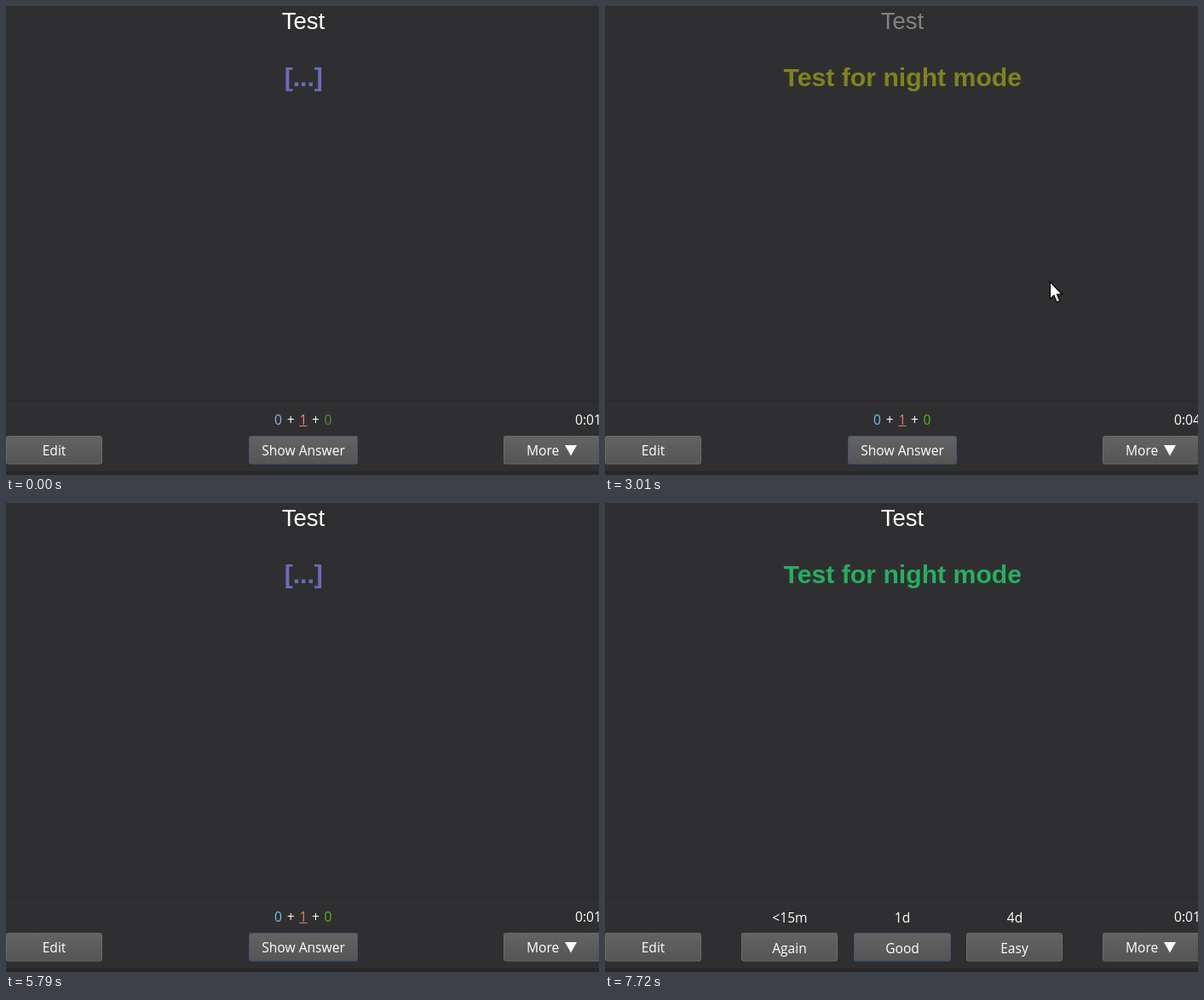
An HTML page for the animation above (8 s loop, 696x550 px).

```html
<!DOCTYPE html>
<html lang="en">
<head>
<meta charset="utf-8">
<title>Flashcard review</title>
<style>
  html, body { margin: 0; width: 100%; height: 100%; overflow: hidden; background: #2f2f31; }
  svg { display: block; width: 696px; height: 550px; }
  text { fill: #fff; font: 15.6px "Open Sans", "Noto Sans", sans-serif; text-anchor: middle; }
  #card text { font-family: "Liberation Sans", Arial, sans-serif; }
  #front { font-size: 27.5px; }
  #cloze { font-size: 30.2px; font-weight: bold; }
  #time, .start { text-anchor: start; }
  .btn rect { fill: url(#face); stroke: #6b6b6b; }
  .btn.focus rect { stroke: #455579; }
  .btn.hover rect { fill: url(#lit); }
</style>
</head>
<body>
<svg viewBox="0 0 696 550">
  <defs>
    <linearGradient id="face" x2="0" y2="1"><stop stop-color="#636363"/><stop offset="1" stop-color="#555"/></linearGradient>
    <linearGradient id="lit" x2="0" y2="1"><stop stop-color="#6b6b6b"/><stop offset="1" stop-color="#646464"/></linearGradient>
  </defs>
  <rect width="696" height="550" fill="#2f2f31"/>
  <path d="M0 462.5H696" stroke="#29292b"/>
  <rect y="546" width="696" height="4" fill="#2a272b"/>
  <path d="M0 546.5H696" stroke="#232124"/>

  <g id="card">
    <text id="front" x="349" y="27">Test</text>
    <text id="cloze" x="349.3" y="94"></text>
  </g>

  <g id="fixed">
    <text id="time" x="668" y="491"></text>
  </g>
  <g id="ask">
    <text id="due" x="319.5" y="491">0</text>
    <text x="334.3" y="491">+</text>
    <text id="learn" x="349" y="491">1</text>
    <path id="line" d="M344.5 492.5H353.5"/>
    <text x="363.5" y="491">+</text>
    <text id="review" x="378" y="491">0</text>
  </g>
  <g id="grade">
    <text x="217" y="492">&lt;15m</text>
    <text x="349" y="492">1d</text>
    <text x="481" y="492">4d</text>
  </g>
  <path id="cursor" d="M.5.7V20.4L5 16.2L8.2 24.2L11.7 22.7L8.5 15H14.3Z" fill="#fff" stroke="#000" stroke-width="1.1"/>
</svg>
<script>
const $ = id => document.getElementById(id);

function button(parent, x, w, label, y, focus) {
  const g = document.createElementNS("http://www.w3.org/2000/svg", "g");
  g.setAttribute("class", focus ? "btn focus" : "btn");
  g.innerHTML = `<rect x="${x + .5}" y="504.5" width="${w - 1}" height="32.5" rx="2"/>` +
    `<text x="${x + w / 2}" y="${y}">${label}</text>`;
  $(parent).append(g);
  return g;
}

button("fixed", 0, 113, "Edit", 527);
const more = button("fixed", 584, 114, "", 527);
more.innerHTML += '<text class="start" x="611" y="527">More</text><path d="M656 515H670L663 527.5Z" fill="#fff"/>';
const show = button("ask", 285, 128, "Show Answer", 527, true);
button("grade", 160, 113, "Again", 528);
const good = button("grade", 292, 114, "Good", 528, true);
button("grade", 424, 113, "Easy", 528);

const YELLOW = "#ffff00", GREEN = "#27ae60";
const SOFT = ["#8fb4e0", "#f0877a", "#5d8a3c"], VIVID = ["#6cc0ee", "#e58260", "#4fbe10"];
const ask = { answer: "", bar: "ask", fade: 1 };
const green = { answer: GREEN, bar: "grade", fade: 1 };
const leave = fade => ({ bar: "ask", fade });

// each step changes only the listed values
const steps = [
  [0, { ...ask, sec: 1, at: null, hover: false, hues: SOFT }],
  [600, { at: [428, 531], hover: false }],
  [670, { at: [392, 525], hover: true }],
  [750, { at: [375, 521] }],
  [980, { sec: 2 }],
  [1300, { at: [374, 520] }],
  [1610, { answer: YELLOW, bar: "grade", hover: false }],
  [1690, { hover: true }],
  [1930, { at: [389, 500], hover: false }],
  [2000, { at: [434, 441], sec: 3 }],
  [2080, { at: [484, 374] }],
  [2150, { at: [515, 334] }],
  [2230, { at: [522, 323] }],
  [2930, { ...leave(.8), hues: VIVID }],
  [3010, { ...leave(.4), sec: 4 }],
  [3090, { ...ask, sec: 0 }],
  [3250, { at: [566, 321] }],
  [3330, { at: [648, 332] }],
  [3400, { at: null }],
  [3940, green],
  [4010, { sec: 1 }],
  [4490, leave(0)], [4560, ask],
  [5030, green],
  [5640, leave(.5)], [5710, { ...ask, fade: .5 }], [5790, ask],
  [6100, green],
  [6560, leave(0)], [6630, ask],
  [6950, green],
  [7340, leave(.5)], [7410, { ...ask, fade: .5 }], [7490, ask],
  [7720, green]
];

function draw(t) {
  const s = {};
  for (const [at, change] of steps) if (at <= t) Object.assign(s, change);
  $("cloze").textContent = s.answer ? "Test for night mode" : "[...]";
  $("cloze").style.fill = s.answer || "#6b6bbd";
  $("card").style.opacity = s.fade;
  $("time").textContent = "0:0" + s.sec;
  for (const id of ["ask", "grade"]) $(id).style.display = s.bar === id ? "" : "none";
  ["due", "learn", "review"].forEach((id, i) => $(id).style.fill = s.hues[i]);
  $("line").style.stroke = s.hues[1];
  show.classList.toggle("hover", s.hover);
  good.classList.toggle("hover", s.hover);
  $("cursor").style.display = s.at ? "" : "none";
  if (s.at) $("cursor").setAttribute("transform", `translate(${s.at})`);
}

const start = performance.now();
function tick() {
  draw((performance.now() - start) % 8000);
  requestAnimationFrame(tick);
}
tick();
</script>
</body>
</html>
```
